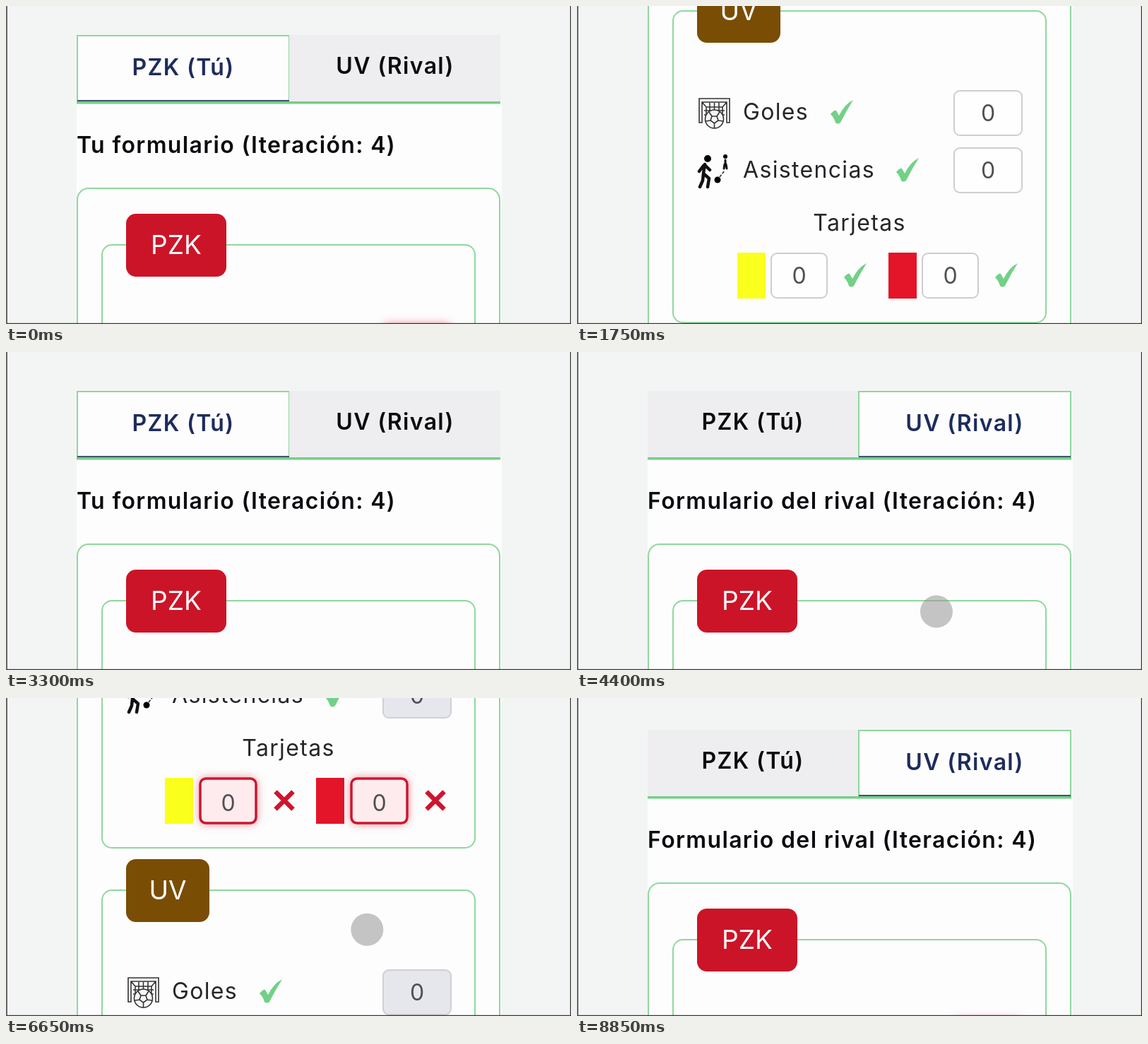
Write an HTML page that moves like this. It is 800 px wide and 450 px high and loops after 8900 ms.

```html
<!DOCTYPE html>
<html lang="es">
<head>
<meta charset="utf-8">
<style>
  html, body { margin: 0; width: 100%; height: 100%; overflow: hidden; background: #f3f5f5; }
  svg { display: block; }
  text { font: 400 32px Inter, sans-serif; letter-spacing: .042em; fill: #26262a; }
  .mid { text-anchor: middle; }
  .bold { font-weight: 600; fill: #0c0c10; }
  .navy { fill: #1e2c5c; }
  .badge { font-size: 37px; letter-spacing: 0; fill: #fff; }
  .value { letter-spacing: 0; fill: #505054; }
  .frame { fill: #fdfdfd; stroke: #90d79e; stroke-width: 2; }
  .box { fill: #fefefe; stroke: #cfcdcd; stroke-width: 2; }
  .off { fill: #e6e7ec; stroke: #cfcfd4; }
  .bad { fill: #fdebed; stroke: #cc1630; stroke-width: 3.5; filter: drop-shadow(0 0 6px #e0304888); }
  .ok { fill: #72d186; }
  .cross { stroke: #cf1530; stroke-width: 6.5; }
  .thin { fill: none; stroke: #333; stroke-width: 1.6; }
  .limb { fill: none; stroke: #111; stroke-width: 4.5; stroke-linecap: round; stroke-linejoin: round; }
</style>
</head>
<body>
<svg id="stage" width="800" height="450" viewBox="0 0 800 450"></svg>
<script>
const LOOP = 8900, SWITCH = 3850;
const TEAMS = [["PZK", "#cc1428", 142], ["UV", "#7a4d05", 118]];

const rect = (x, y, w, h, attrs) => `<rect x="${x}" y="${y}" width="${w}" height="${h}" ${attrs}/>`;
const text = (x, y, cls, s) => `<text x="${x}" y="${y}" class="${cls}">${s}</text>`;

const mark = (x, y, bad) => `<g transform="translate(${x} ${y})">` + (bad
  ? `<path class="cross" d="M-12.500-12.500 12.500 12.500M12.500-12.500-12.500 12.500"/>`
  : `<path class="ok" d="M-16 3Q-11-3-8-2L-4 5Q4-11 16-17Q6-1-2 15Q-6 18-9 15Q-11 8-16 3Z"/>`) + `</g>`;

const input = (x, y, w, value, bad, rival) =>
  rect(x, y, w, 63, `rx="8" class="box ${bad ? "bad" : rival ? "off" : ""}"`) +
  text(x + w / 2, y + (bad ? 46 : 43), "mid value", value);

const goalIcon = y => `<g transform="translate(171 ${y})">
  <path class="thin" stroke-width="2" d="M2 36V2H45V36H41V7H6V36ZM6 7 12 14H35L41 7M12 14V30M35 14V30M17 8V20M23.500 8V18M30 8V20M9 19H38M9 25H38"/>
  <circle class="thin" cx="23.500" cy="31" r="13" style="fill:#f6f6f6"/>
  <path class="thin" d="M20 27H27L29 33 23.500 37 18 33ZM20 27 16 21M27 27 31 21M29 33 36 34M18 33 11 34M23.500 37V44"/></g>`;

const passIcon = y => `<g transform="translate(171 ${y})">
  <circle cx="14" cy="7" r="5"/><circle cx="28" cy="37" r="4.500"/>
  <circle cx="39" cy="4" r="3"/>
  <path class="limb" d="M10 15 8 28 16 35 14 47M8 28 7 38 3 47M10 16 17 23M8 17 2 25"/>
  <path class="limb" style="stroke-width:3" d="M39 9V14M38 15 37 21M40 15 41 21"/>
  <path class="thin" stroke-dasharray="4 2" d="M31 33 38 24"/></g>`;

function player(team, top, rival) {
  const [name, color, width] = TEAMS[team], bad = team === 0;
  const value = bad && !rival ? 1 : 0;
  const card = (x, fill) =>
    rect(x - (bad ? 2 : 0), top + 342, 40, 65, `fill="${fill}"`) +
    input(x + 48, top + 343, 79, value, bad, rival) +
    mark(x + 167, top + 374, bad);
  return rect(136, top, 528, 441, `rx="14" class="frame"`) +
    rect(170, top - 44, width, 89, `rx="14" fill="${color}"`) +
    text(170 + width / 2, top + 13, "badge mid", name) +
    goalIcon(top + 122) + text(235, top + 154, "", "Goles") +
    mark(375, top + 143, bad) + input(534, top + 113, 96, value, bad, rival) +
    passIcon(top + 202) + text(235, top + 236, "", "Asistencias") +
    mark(468, top + 225, false) + input(534, top + 194, 96, 0, false, rival) +
    text(400, top + 311, "mid", "Tarjetas") +
    card(227, "#fbff1c") + card(441, "#e41429");
}

function page(rival) {
  const tab = (i, label) => {
    const active = i === +rival, x = i ? (rival ? 399 : 402) : 101;
    return (active
      ? rect(x, 56, 300, 94, `class="frame"`) + rect(x, 147, 300, 3, `fill="#3c5470"`)
      : rect(x - 1, 55, 299, 95, `fill="#eeedef"`)) +
      text((i ? 551 : 251) - (rival ? 2 : 0), active ? 112 : 110, "mid bold " + (active ? "navy" : ""), label);
  };
  return `<g>` + rect(100, 150, 602, 1300, `fill="#fdfdfd"`) +
    tab(0, TEAMS[0][0] + " (Tú)") + tab(1, "UV (Rival)") +
    rect(100, 149, 600, 3.5, `fill="#74cf86"`) +
    text(100, 222, "bold", (rival ? "Formulario del rival" : "Tu formulario") + " (Iteración: 4)") +
    rect(101, 272, 598, 1058, `rx="16" class="frame"`) +
    player(0, 352, rival) + player(1, 853, rival) + `</g>`;
}

const stage = document.getElementById("stage");
stage.innerHTML = page(false) + page(true) +
  `<circle r="23" fill="#969696" fill-opacity=".55"/>
   <path d="M1 0V449.500H799.500V0" fill="none" stroke="#3a3a3c" stroke-width="1.500"/>`;
const [mine, theirs, finger] = stage.children;

// start, end, scroll position reached
const SCROLLS = [
  [0, 150, 0], [550, 1150, 470], [1150, 1700, 846], [2200, 2750, 400], [2750, 3200, 0],
  [4400, 5150, 588], [5350, 6000, 846], [6350, 7000, 246], [7300, 8300, 10]
];
// start, end, from x, y, to x, y
const TOUCHES = [
  [550, 850, 520, 360, 545, 130], [1150, 1400, 530, 350, 550, 110],
  [2200, 2500, 500, 130, 510, 350], [2750, 3000, 500, 130, 510, 350],
  [3750, 3900, 550, 108, 550, 108], [4350, 4750, 508, 378, 530, 130],
  [5350, 5750, 575, 350, 590, 84], [6350, 6700, 500, 120, 512, 340],
  [7300, 7800, 500, 140, 505, 351]
];

const ease = (t, a, b) => {
  const p = Math.min(1, Math.max(0, (t - a) / (b - a)));
  return p * p * (3 - 2 * p);
};

function draw(now) {
  const t = Math.floor(now % LOOP / 50) * 50;
  const y = SCROLLS.reduce((pos, [a, b, goal]) => pos + (goal - pos) * ease(t, a, b), 14);
  const rival = t >= SWITCH;
  mine.style.display = rival ? "none" : "";
  theirs.style.display = rival ? "" : "none";
  (rival ? theirs : mine).setAttribute("transform", `translate(0 ${-Math.round(y)})`);

  const touch = TOUCHES.find(([a, b]) => t >= a && t < b);
  finger.style.display = touch ? "" : "none";
  if (touch) {
    const [a, b, x0, y0, x1, y1] = touch, p = ease(t, a, b);
    finger.setAttribute("cx", x0 + (x1 - x0) * p);
    finger.setAttribute("cy", y0 + (y1 - y0) * p);
  }
  requestAnimationFrame(draw);
}
requestAnimationFrame(draw);
</script>
</body>
</html>
```
